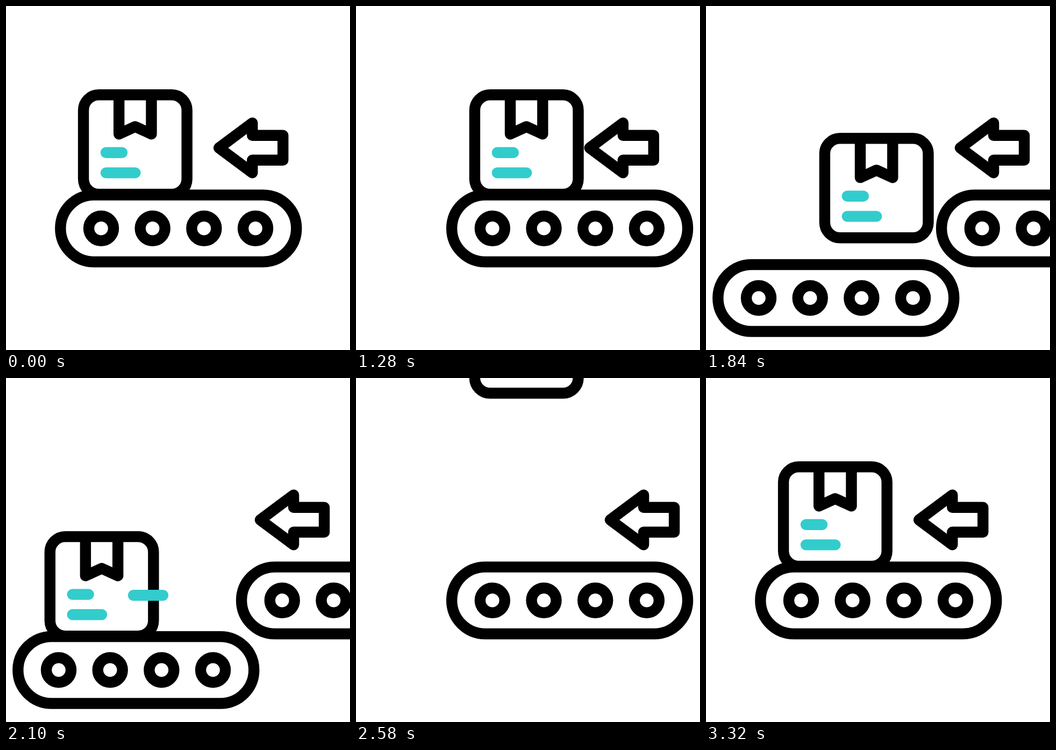
Recreate the animation shown at these times as an HTML page. Size 640 px wide and 640 px high, loop 3420 ms.

```html
<!DOCTYPE html>
<html lang="en">
<head>
<meta charset="utf-8">
<title>Conveyor</title>
<style>
html, body { margin: 0; height: 100%; overflow: hidden; background: #fff; }
svg { display: block; width: 100%; height: 100%; }
</style>
</head>
<body>
<svg viewBox="0 0 640 640" fill="none" stroke="#000" stroke-width="20.4" stroke-linecap="round" stroke-linejoin="round">
  <defs>
    <g id="belt">
      <rect x="101.3" y="351.6" width="439" height="124.4" rx="62.2"/>
      <circle cx="177" cy="413.8" r="23"/>
      <circle cx="272.7" cy="413.8" r="23"/>
      <circle cx="368.4" cy="413.8" r="23"/>
      <circle cx="464.1" cy="413.8" r="23"/>
    </g>
  </defs>
  <use id="upper" href="#belt"/>
  <use id="lower" href="#belt"/>
  <g id="box">
    <rect x="144.1" y="165.3" width="192.6" height="185" rx="28.5"/>
    <path d="M210.2 165.3V238.2L240.4 224.4L270.5 238.2V165.3"/>
    <path stroke="#3cc" d="M186 272.8H216M186 310.4H240.4"/>
  </g>
  <path id="arrow" d="M396.2 264L458.3 217.6V240.8H515.3V286.8H458.3V310.2Z"/>
  <path id="trail" stroke="#3cc"/>
</svg>
<script>
const LOOP = 3420, STEP = 20;
const [upper, lower, box, arrow, trail] =
  ['upper', 'lower', 'box', 'arrow', 'trail'].map(id => document.getElementById(id));

// Eased progress from 0 to 1 between times a and b
const ease = (t, a, b) => {
  const p = Math.min(1, Math.max(0, (t - a) / (b - a)));
  return p * p * (3 - 2 * p);
};
const there = (t, a, b, c, d) => ease(t, a, b) - ease(t, c, d);
const move = (el, x, y = 0) => el.setAttribute('transform', `translate(${x} ${y})`);

function draw(t) {
  const shift = 76.8 * there(t, 360, 620, 3060, 3320);

  const nudge = there(t, 720, 907, 907, 1093) + there(t, 1093, 1280, 1280, 1467);
  move(arrow, shift - 38.3 * nudge);

  move(upper, shift + 260 * there(t, 1440, 1720, 2225, 2560));
  move(lower, -553 + 474 * there(t, 1270, 1622, 2225, 2560), 129.5);

  // The box drops, slides away, then comes in from above
  if (t < 2440) move(box, shift - 430 * ease(t, 1940, 2361), 129.8 * ease(t, 1700, 1940));
  else move(box, shift, -362 * (1 - ease(t, 2455, 3060)));

  const head = 292 - 200 * ease(t, 2041, 2212);
  const tail = 292 - 200 * ease(t, 2105, 2276);
  trail.setAttribute('d', tail - head > 0.5 ? `M${head} 404.3H${tail}` : '');
}

const start = performance.now();
function tick() {
  const t = (performance.now() - start) % LOOP;
  draw(Math.floor(t / STEP) * STEP);
  requestAnimationFrame(tick);
}
tick();
</script>
</body>
</html>
```
